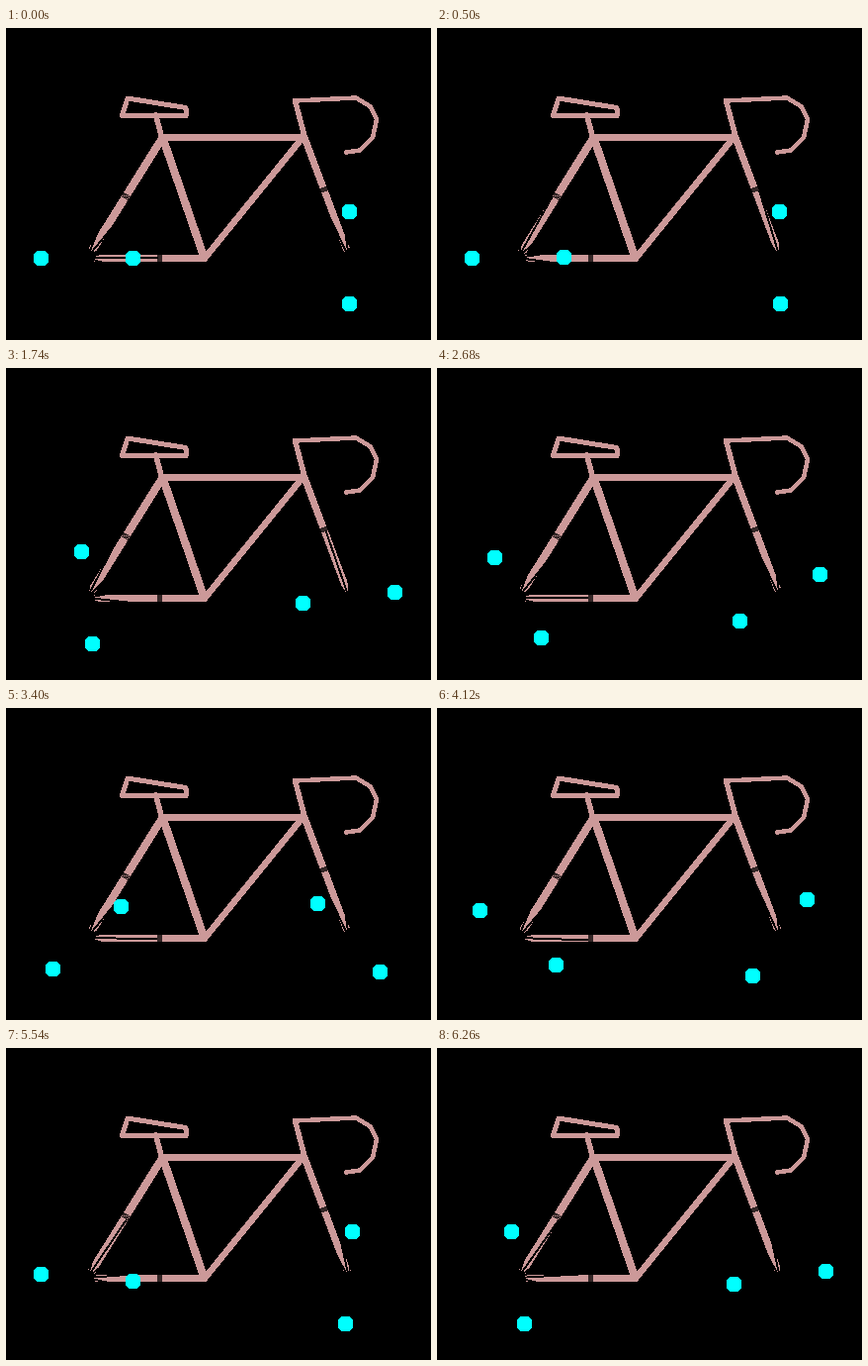
Write an HTML page that moves like this. It is 430 px wide and 315 px high and loops after 6280 ms.

```html
<!DOCTYPE html>
<html lang="en">
<head>
<meta charset="utf-8">
<title>Bicycle</title>
<style>
  html, body { margin: 0; width: 100%; height: 100%; overflow: hidden; background: #000; }
  svg { display: block; width: 430px; height: 315px; }
  .frame { fill: none; stroke: #cc9999; stroke-linecap: round; stroke-linejoin: round; }
  .wheel { fill: none; stroke: #000; }
  .reflector { fill: #0ff; }
</style>
</head>
<body>
<svg viewBox="0 0 430 315" shape-rendering="crispEdges">
  <rect width="430" height="315"/>
  <g class="frame">
    <path stroke-width="7" d="M84 232.5H201 M159 110.5H301"/>
    <path stroke-width="8" d="M83 231L158.5 110.5L200.5 232"/>
    <path stroke-width="6.5" d="M201 232.5L301 109.5"/>
    <path stroke-width="7" d="M301.5 109.5L347 230"/>
    <path stroke-width="5.5" d="M302 109L292.5 73.5 M157 108L151.5 88"/>
    <path stroke-width="4.5" d="M292.5 73.5L354 70.5L369 79.5L375 92.5L371 110.5L358 123.5L344 125.5"/>
    <path stroke-width="5" d="M123 71L182 80.5V88.5H117.5Z"/>
  </g>
  <g id="wheels"></g>
</svg>
<script>
const STEP_MS = 20, STEPS = 314, TURN_PER_STEP = 1 / 8;
const RIM = 71.5, RIM_LINES = 5, REFLECTOR_DISTANCE = 46.9;
const SPOKES = 21, SPOKE_GAP = 0.3;
const REFLECTOR = 'M-4 -7.5H4L7.5 -4V4L4 7.5H-4L-7.5 4V-4Z';

const layer = document.getElementById('wheels');
const degrees = radians => radians * 180 / Math.PI;
const snap = value => Math.floor(value) + 0.5;

function add(parent, tag, attributes) {
  const node = document.createElementNS('http://www.w3.org/2000/svg', tag);
  for (const name in attributes) node.setAttribute(name, attributes[name]);
  return parent.appendChild(node);
}

function makeWheel(x, y, phase) {
  const black = add(layer, 'g', { class: 'wheel', transform: `translate(${x} ${y})` });

  // Thin concentric lines let a little of the tubes show through on diagonals.
  for (let i = 0; i < RIM_LINES; i++) {
    add(black, 'circle', { r: RIM + i, 'stroke-width': 0.75 });
  }
  const spokes = add(black, 'g', { 'stroke-width': 2 });
  for (let i = 0; i < SPOKES; i++) {
    add(spokes, 'path', { d: `M0 0H${RIM}`, transform: `rotate(${degrees(i * SPOKE_GAP)})` });
  }
  const reflectors = [1, -1].map(side => ({
    reach: side * REFLECTOR_DISTANCE,
    node: add(layer, 'path', { class: 'reflector', d: REFLECTOR })
  }));

  return turn => {
    const angle = turn + phase;
    spokes.setAttribute('transform', `rotate(${degrees(angle)})`);
    for (const { reach, node } of reflectors) {
      const cx = snap(x + reach * Math.cos(angle));
      const cy = snap(y + reach * Math.sin(angle));
      node.setAttribute('transform', `translate(${cx} ${cy})`);
    }
  };
}

const wheels = [makeWheel(82, 232, 0), makeWheel(347, 232, Math.PI / 2)];

function draw(time) {
  const step = Math.floor(time / STEP_MS) % STEPS;
  wheels.forEach(rotate => rotate(step * TURN_PER_STEP));
}

const start = performance.now();

function tick() {
  draw(performance.now() - start);
  requestAnimationFrame(tick);
}

tick();
</script>
</body>
</html>
```
